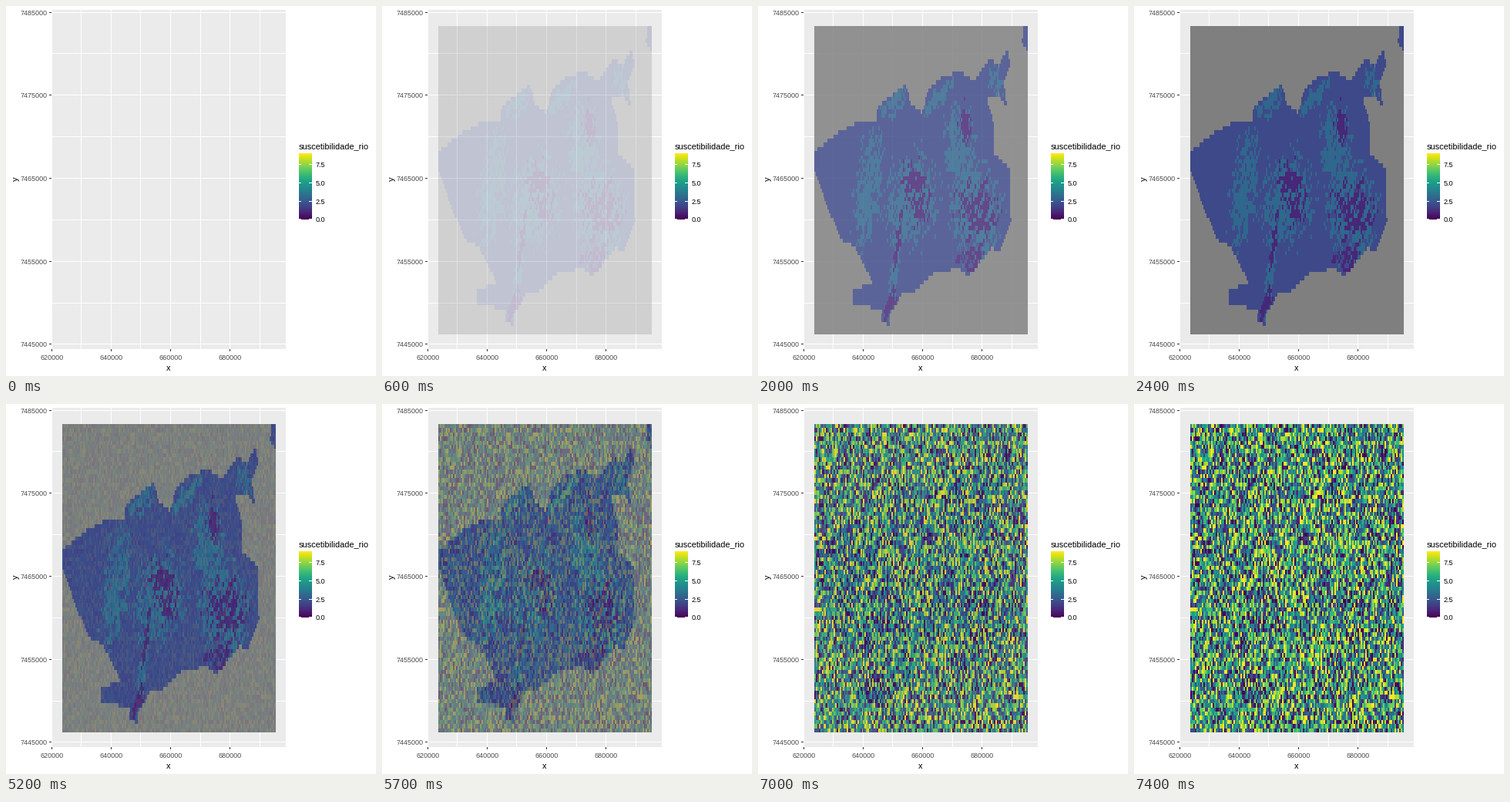
A matplotlib script that plays this animation: 480x480 px, repeating every 10 s.

```python
import numpy as np
import matplotlib
import matplotlib.pyplot as plt
from matplotlib.animation import FuncAnimation
from matplotlib.patches import Rectangle
from matplotlib.path import Path

matplotlib.rcParams["font.family"] = "Liberation Sans"

SIZE, DPI = 480, 72
STEP, FRAMES = 100, 100
FADE, SECOND = 2400, 5000
COLS, ROWS = 144, 74
LEFT, RIGHT, TOP, BOTTOM = 73, 350, 26, 426
VIRIDIS = matplotlib.colormaps["viridis"]

# Key points of the coast, clockwise from the western tip
COAST = [
    (73, 189), (105, 163), (130, 151), (153, 152), (155, 131), (192, 101),
    (198, 127), (213, 138), (222, 108), (238, 92), (264, 85), (280, 98),
    (300, 68), (313, 78), (323, 56), (328, 78), (319, 98), (323, 132),
    (313, 115), (297, 118), (305, 150), (305, 190), (326, 210), (328, 278),
    (315, 318), (303, 314), (273, 351), (262, 341), (232, 344), (202, 370),
    (187, 374), (171, 400), (171, 416), (159, 407), (162, 393), (123, 388),
    (123, 369), (149, 358), (125, 312), (107, 303), (73, 215),
]
ISLET = [(344, 26), (351, 26), (351, 58), (343, 50)]

# Hill areas: centre x, centre y, half width, half height, slant
SLOPES = [
    (173, 130, 16, 28, -0.6), (237, 115, 12, 28, -0.5), (309, 98, 11, 22, 0),
    (143, 235, 17, 85, -0.1), (200, 255, 36, 62, -0.1), (262, 190, 20, 65, 0),
    (284, 265, 34, 66, 0), (178, 340, 6, 58, -0.12),
]
PEAKS = [
    (206, 240, 18, 50, 0.1), (182, 300, 4, 60, -0.12), (268, 155, 10, 28, 0),
    (285, 265, 30, 40, 0), (279, 326, 20, 22, 0), (171, 385, 7, 34, -0.2),
]

rng = np.random.default_rng(7)
gx, gy = np.meshgrid(
    LEFT + (np.arange(COLS) + 0.5) * (RIGHT - LEFT) / COLS,
    TOP + (np.arange(ROWS) + 0.5) * (BOTTOM - TOP) / ROWS,
)


def inside(points):
    cells = np.column_stack([gx.ravel(), gy.ravel()])
    return Path(points).contains_points(cells).reshape(ROWS, COLS)


def grain():
    """Normalised noise with short streaks leaning to the right."""
    n = rng.normal(size=(ROWS, COLS))
    n = n + 0.8 * np.roll(n, (1, -1), (0, 1)) + 0.7 * np.roll(n, 1, 1)
    return n / n.std()


def hills(blobs):
    field = np.full((ROWS, COLS), -9.0)
    for cx, cy, rx, ry, slant in blobs:
        dy = gy - cy
        dx = gx - cx - slant * dy
        field = np.maximum(field, 1 - (dx / rx) ** 2 - (dy / ry) ** 2)
    return field


def terrain():
    level = np.full((ROWS, COLS), 2)
    level[hills(SLOPES) > 0.4 + 0.45 * grain()] = 3
    level[hills(PEAKS) > 0.6 + 0.5 * grain()] = 1
    rgb = VIRIDIS(level / 9)[..., :3]
    rgb[~(inside(COAST) | inside(ISLET))] = 127 / 255
    return rgb


fig = plt.figure(figsize=(SIZE / DPI, SIZE / DPI), dpi=DPI, facecolor="white")
ax = fig.add_axes([0, 0, 1, 1])
ax.axis("off")


def box(x, y, w, h, color, z=1):
    ax.add_patch(Rectangle((x, y), w, h, fc=color, ec="none", lw=0,
                           antialiased=False, zorder=z))


def label(x, y, s, size=9, color="black", **kw):
    ax.text(x, y, s, fontsize=size, color=color, **kw)


def layer(rgb, z):
    return ax.imshow(rgb, extent=(LEFT, RIGHT, BOTTOM, TOP), aspect="auto",
                     interpolation="nearest", alpha=0, zorder=z)


# Panel, grid and axes; every second grid line carries a label
box(59, 5, 304, 440, "#ebebeb")
for i in range(8):
    x = round(58.7 + 38.57 * i)
    box(x, 5, 1, 440, "white", 2)
    if i % 2 == 0:
        box(x, 445, 1, 3, "#333333", 2)
        label(x + 0.5, 459, str(620000 + 10000 * i), color="#4d4d4d",
              ha="center")
for i in range(9):
    y = round(7.6 + 53.86 * i)
    box(59, y, 304, 1, "white", 2)
    if i % 2 == 0:
        box(56, y, 3, 1, "#333333", 2)
        label(54, y + 4, str(7485000 - 5000 * i), color="#4d4d4d", ha="right")
label(211, 473, "x", 11, ha="center")
label(12.5, 224.5, "y", 11, ha="center", va="center", rotation=90)

# Colour bar
label(380, 185, "suscetibilidade_rio", 11)
ax.imshow(VIRIDIS(np.linspace(1, 0, 86))[:, None, :3], aspect="auto",
          extent=(380, 397, 277, 191), interpolation="nearest", zorder=2)
for v in np.arange(0, 9, 2.5):
    y = round(276.5 - v * 86 / 9)
    box(380, y, 3, 1, "white", 3)
    box(393, y, 4, 1, "white", 3)
    label(402, y + 4, f"{v:.1f}")

base = layer(terrain(), 4)
noise = layer(VIRIDIS(rng.integers(0, 10, (ROWS, COLS)) / 9)[..., :3], 5)
ax.set_xlim(0, SIZE)
ax.set_ylim(SIZE, 0)


def fade(t):
    return min(max(t / FADE, 0), 1)


def draw(frame):
    t = frame * STEP
    base.set_alpha(fade(t))
    noise.set_alpha(fade(t - SECOND))
    return base, noise


anim = FuncAnimation(fig, draw, frames=FRAMES, interval=STEP, repeat=True,
                     repeat_delay=0, blit=False)
plt.show()
```
